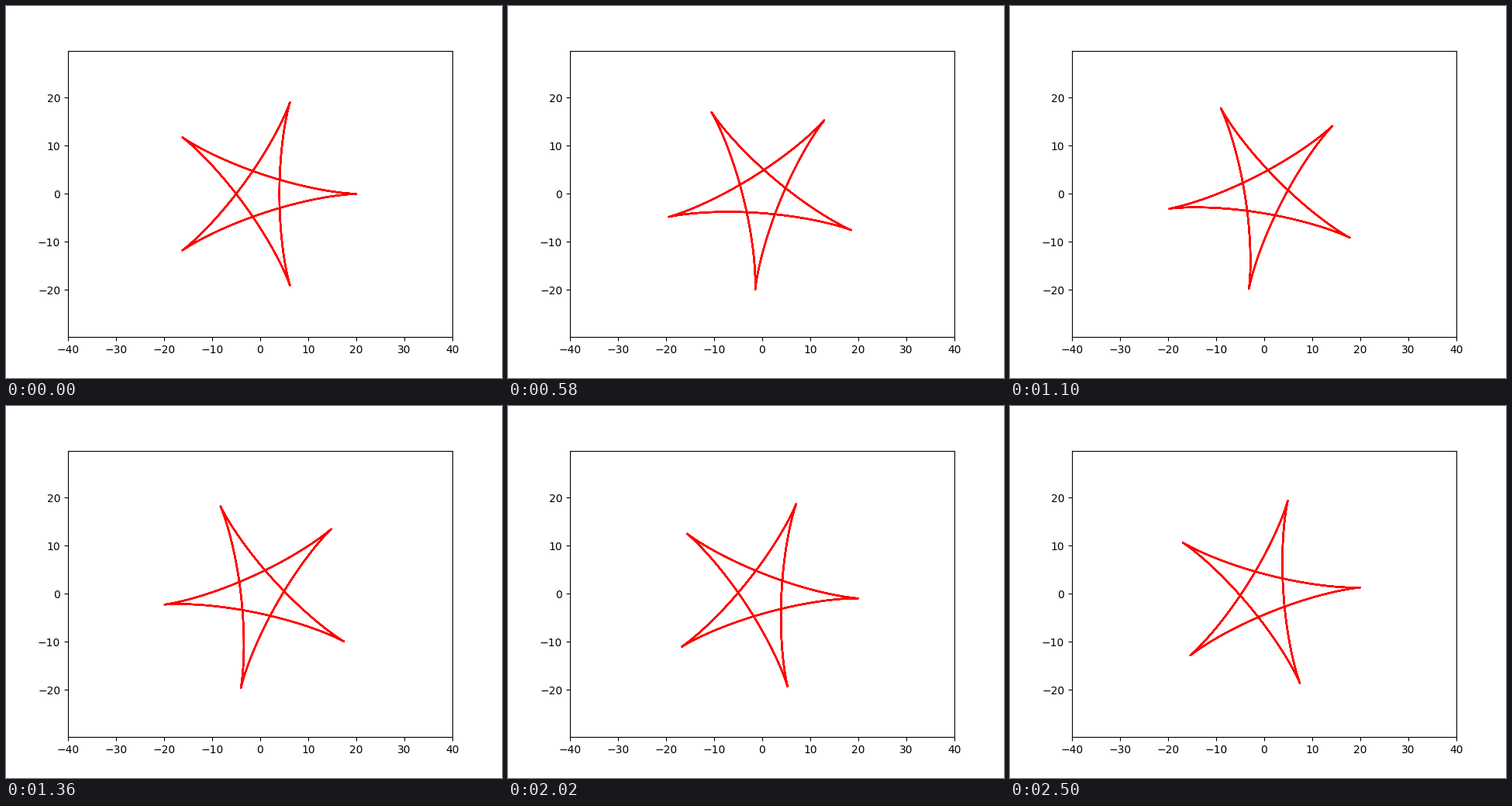
These frames come from a looping animation (640x480 px, 2.52 s). A matplotlib script:

```python
import numpy as np
import matplotlib.pyplot as plt
from matplotlib.animation import FuncAnimation

FRAMES = 126
INTERVAL = 20
STEP = -0.1  # radians turned per frame

OUTER, INNER = 20, 8
TURNS = 10  # the star closes every two turns; retracing it firms up the line


def hypocycloid(big, small, t):
    """Curve of a point on a circle rolling inside a bigger one, as complex numbers."""
    gap = big - small
    return gap * np.exp(1j * t) + small * np.exp(-1j * gap / small * t)


star = hypocycloid(OUTER, INNER, np.linspace(0, 2 * np.pi * TURNS, 200 * TURNS + 1))

fig, ax = plt.subplots(figsize=(6.4, 4.8), dpi=100)
ax.set_xlim(-40, 40)
half_height = 40 * 3.696 / 4.96  # equal units on both axes
ax.set_ylim(-half_height, half_height)
ax.set_yticks(range(-20, 21, 10))
line, = ax.plot([], [], color="red", lw=1.5)


def draw(i):
    z = star * np.exp(1j * STEP * i)
    line.set_data(z.real, z.imag)
    return line,


anim = FuncAnimation(fig, draw, frames=FRAMES, interval=INTERVAL,
                     repeat=True, repeat_delay=0)
plt.show()
```
